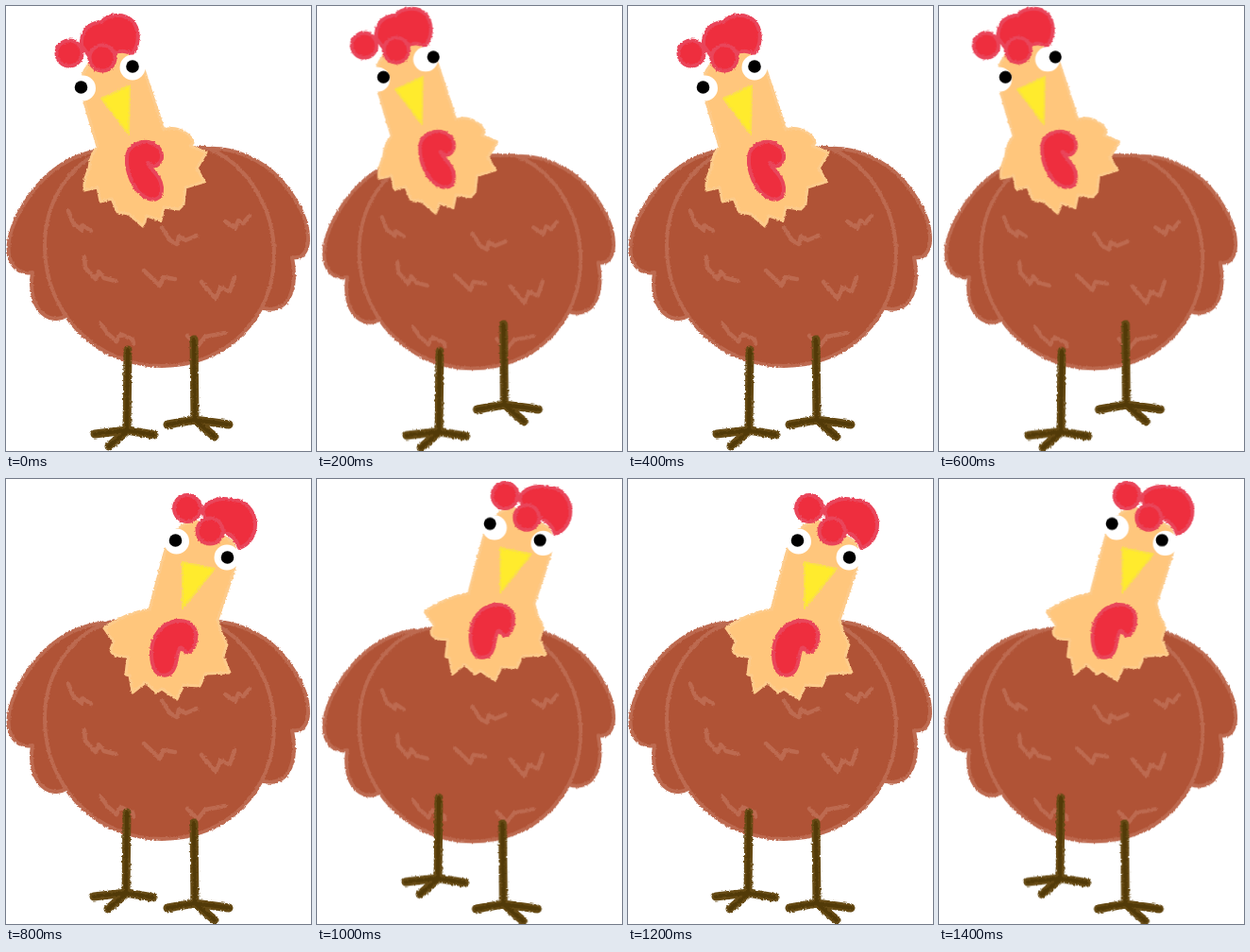
Recreate the animation shown at these times as an HTML page. Size 323x471 px, loop 1600 ms.

```html
<!DOCTYPE html>
<html lang="en">
<head>
<meta charset="utf-8">
<title>Dancing hen</title>
<style>
html, body { margin: 0; width: 100%; height: 100%; overflow: hidden; background: #fff; }
svg { display: block; width: 100vw; height: 100vh; }
path, circle { stroke-linecap: round; stroke-linejoin: round; }

.brown { fill: #b05336; stroke: #bd6a50; stroke-width: 4; }
.mark { fill: none; stroke: #bd6a50; stroke-width: 4.5; }
.skin { fill: #ffc67c; stroke: #fdcb8b; stroke-width: 3; }
.red { fill: #ee2e3e; stroke: #e9455a; stroke-width: 4; }
.beak { fill: #ffeb2d; stroke: #fbe04a; stroke-width: 2; }
.white { fill: #fff; }
.bark { fill: none; stroke: #664a14; stroke-width: 9; }
.core { fill: none; stroke: #523a08; stroke-width: 4; }

/* hop: shared 400 ms bounce; turn: which way the head looks */
.hop { animation: hop .4s step-end infinite; }
.turn { animation: turn 1.6s step-end infinite; }
.other { animation-delay: -.8s; }
.leg { animation: 1.6s step-end infinite; }
.left { animation-name: left; }
.right { animation-name: right; }

.body { --hop: matrix(.966, 0, 0, .976, 5, 11.8); }
.head-l { --hop: matrix(.97, 0, 0, .97, -15, -6.7); }
.head-r { --hop: matrix(.963, 0, 0, .97, 14.2, -12.6); }
.gaze-l { --hop: translate(8.5px, -1.5px); }
.gaze-r { --hop: translate(-4px, -3.3px); }

@keyframes hop {
  0% { transform: none; }
  50% { transform: var(--hop); }
}
@keyframes turn {
  0% { visibility: visible; }
  50%, 100% { visibility: hidden; }
}
@keyframes left {
  0%, 25% { transform: none; }
  12.5%, 37.5% { transform: translate(1px, 1.5px); }
  50%, 75% { transform: translate(-1px, -11px); }
  62.5%, 87.5% { transform: translate(0, -26.5px); }
}
@keyframes right {
  0%, 25% { transform: none; }
  12.5%, 37.5% { transform: translate(-1.5px, -16px); }
  50%, 75% { transform: translate(0, 11px); }
  62.5%, 87.5% { transform: translate(-2.5px, 12px); }
}
</style>
</head>
<body>
<svg viewBox="0 0 323 471">
  <defs>
    <filter id="crayon" filterUnits="userSpaceOnUse" x="-20" y="-20" width="363" height="511" color-interpolation-filters="sRGB">
      <feTurbulence type="fractalNoise" baseFrequency=".4" numOctaves="2" seed="4"/>
      <feDisplacementMap in="SourceGraphic" scale="3" xChannelSelector="R" yChannelSelector="G"/>
    </filter>
    <path id="legL" d="M129 364L128 449M94 453L128 449L157 454M128 450L109 466"/>
    <path id="legR" d="M199 353L200 438M171 443L200 438L236 443M200 438L221 456"/>
  </defs>

  <g class="body hop"><g filter="url(#crayon)">
    <path class="brown" d="M112 153C84 150 52 167 31 193C11 218-2 247 4 267C8 280 18 284 28 282C25 301 29 320 42 328C50 333 57 332 64 328L150 260Z"/>
    <path class="brown" d="M212 151C240 149 271 162 291 184C308 204 320 226 320 246C320 261 313 268 303 266C307 286 305 304 296 314C288 322 279 322 270 319L190 260Z"/>
    <path class="brown" d="M116 150C70 160 41 205 41 254C41 326 96 381 165 381C234 381 284 330 284 263C284 215 256 166 212 150Z"/>
    <path class="mark" d="M66 217L71 230L80 237L81 232L90 238
      M165 235L174 248L181 252L183 244L190 248L202 243
      M232 228L243 235L246 227L251 230L258 222
      M83 266L84 277L95 289L98 281L104 288L116 291
      M146 280L163 296L166 287L179 289
      M207 292L222 310L227 298L237 302L242 287
      M100 336L108 347L117 355L121 347L134 353L135 357
      M192 349L203 360L211 350L232 346"/>
  </g></g>

  <g class="leg left" filter="url(#crayon)"><use href="#legL" class="bark"/><use href="#legL" class="core"/></g>
  <g class="leg right" filter="url(#crayon)"><use href="#legR" class="bark"/><use href="#legR" class="core"/></g>

  <g class="turn"><g class="head-l hop">
    <g filter="url(#crayon)">
      <path class="skin" d="M79 88C78 68 92 52 112 48C130 46 141 54 147 70L167 131Q178 127 188 133Q197 138 198 145L195 148L212 155L202 172L210 186L190 192L188 210L183 215L167 213L164 227L149 222L145 233L130 220L118 218L112 204L100 207L97 192L83 195Q82 184 88 172Q89 158 97 149Z"/>
      <path class="red" d="M80 42C79 28 86 18 101 17C108 9 124 7 133 15C142 24 142 41 133 51Q124 45 115 50L92 58Z"/>
      <circle class="red" cx="67" cy="50" r="13.5"/>
      <circle class="red" cx="102" cy="55" r="13.5"/>
      <path class="red" d="M128 161C128 148 143 141 154 145C165 149 168 160 162 167C157 172 153 168 150 166C153 174 164 179 165 192C166 206 155 207 147 202C135 195 127 176 128 161Z"/>
      <path class="beak" d="M101 98L131 84L130 136Z"/>
    </g>
    <g class="white"><circle cx="81.5" cy="87" r="13.5"/><circle cx="134" cy="65" r="13.5"/></g>
    <g class="gaze-l hop"><circle cx="79.5" cy="86" r="6.8"/><circle cx="134" cy="64" r="6.8"/></g>
  </g></g>

  <g class="turn other"><g class="head-r hop">
    <g filter="url(#crayon)">
      <path class="skin" d="M168 78C174 58 184 48 200 44L240 66Q246 80 241 98L224 149L228 163L234 175L230 188L237 205L211 206L205 219L188 218L181 233L165 222L159 226L148 215L134 226L131 208L127 207L129 188Q111 188 111 180L114 172L104 158Q118 148 135 142Q145 139 152 138Z"/>
      <path class="red" d="M208 34C212 24 224 19 238 22C253 21 264 34 264 48C264 60 257 70 247 73Q243 60 231 56L214 52Z"/>
      <circle class="red" cx="192" cy="31" r="14"/>
      <circle class="red" cx="216" cy="55" r="13.5"/>
      <path class="red" d="M154 184C154 167 164 152 182 150C197 149 203 160 201 170C200 180 195 185 190 183C186 181 187 177 184 179C180 186 182 196 176 204C171 209 162 209 158 203C155 198 154 191 154 184Z"/>
      <path class="beak" d="M187 88L221 95L187 137Z"/>
    </g>
    <g class="white"><circle cx="180.5" cy="66" r="13.5"/><circle cx="234" cy="83" r="13.5"/></g>
    <g class="gaze-r hop"><circle cx="179.5" cy="65" r="6.8"/><circle cx="234.5" cy="83" r="6.8"/></g>
  </g></g>
</svg>
</body>
</html>
```
